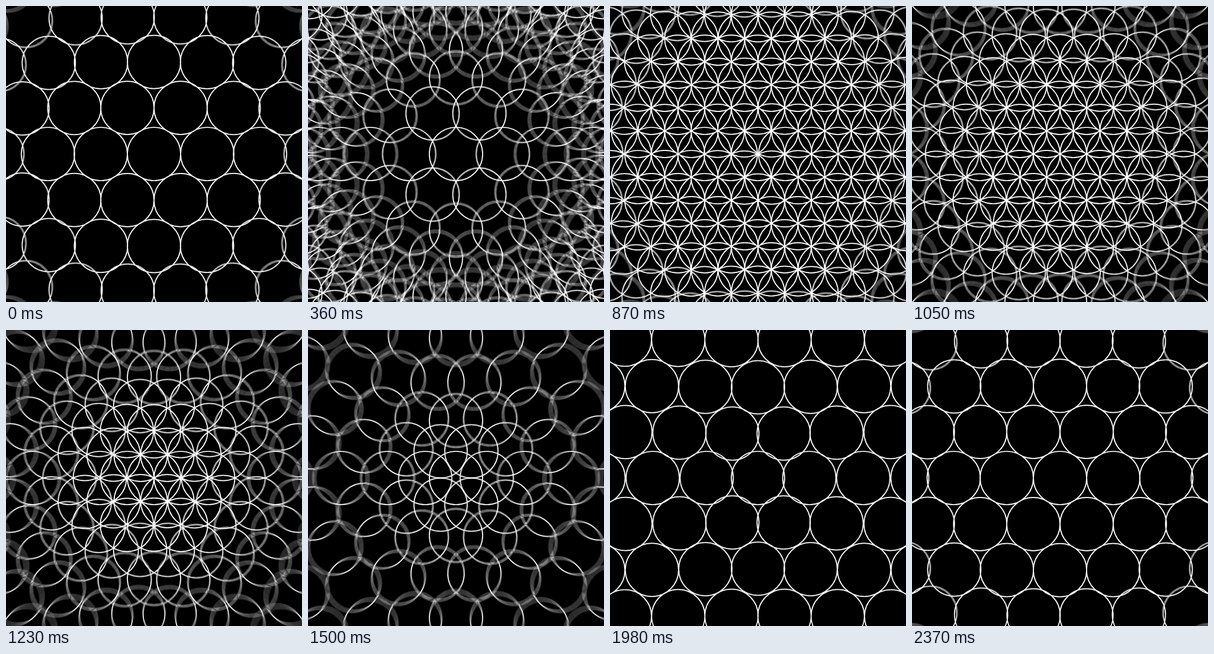
Animation, 500 px wide and 500 px high, one loop 2.4 s. Source, as an HTML page with a canvas:

```html
<!DOCTYPE html>
<html lang="en">
<head>
<meta charset="utf-8">
<title>Breathing circle lattice</title>
<style>
  html, body { margin: 0; width: 100%; height: 100%; overflow: hidden; background: #000; }
  canvas { display: block; width: 500px; height: 500px; }
</style>
</head>
<body>
<canvas id="stage" width="500" height="500"></canvas>
<script>
const SIZE = 500, MID = SIZE / 2;
const LOOP = 2400, STEP = 30;
const RADIUS = 45, GAP = 90, REACH = 820;
const LEAD = 0.945; // ms of head start per pixel from the centre
const SAMPLES = 15, SHUTTER = 1;
const TAU = Math.PI * 2;

const ctx = document.getElementById('stage').getContext('2d');

// Hexagonal lattice around the centre, with each point's distance from it.
const points = [];
for (let row = -11; row <= 11; row++) {
  for (let col = -16; col <= 16; col++) {
    const x = (col + row / 2) * GAP;
    const y = row * GAP * Math.sqrt(3) / 2;
    const dist = Math.hypot(x, y);
    if (dist < REACH) points.push({ x, y, dist });
  }
}

const smooth = p => p * p * (3 - 2 * p);

// Scale swings between 1 and 1/2; outer points move first.
function scaleAt(ms, dist) {
  const wave = (1 - Math.cos(TAU * (ms + LEAD * dist) / LOOP)) / 2;
  return 1 - smooth(wave) / 2;
}

function strokeLattice(ms) {
  const limit = MID + RADIUS + 2;
  ctx.beginPath();
  for (const { x, y, dist } of points) {
    const s = scaleAt(ms, dist);
    const px = x * s, py = y * s;
    if (Math.abs(px) > limit || Math.abs(py) > limit) continue;
    ctx.moveTo(MID + px + RADIUS, MID + py);
    ctx.arc(MID + px, MID + py, RADIUS, 0, TAU);
  }
  ctx.stroke();
}

// Motion blur: equal exposures across the open shutter add up to white.
function render(ms) {
  ctx.globalCompositeOperation = 'source-over';
  ctx.fillStyle = '#000';
  ctx.fillRect(0, 0, SIZE, SIZE);
  ctx.globalCompositeOperation = 'lighter';
  ctx.strokeStyle = '#111';
  ctx.lineWidth = 1.7;
  for (let i = 0; i < SAMPLES; i++) {
    strokeLattice(ms + STEP * SHUTTER * i / SAMPLES);
  }
}

let shown = -1;
function tick(now) {
  const step = Math.floor((now % LOOP + 2) / STEP) % (LOOP / STEP);
  if (step !== shown) {
    shown = step;
    render(step * STEP);
  }
  requestAnimationFrame(tick);
}

render(0);
requestAnimationFrame(tick);
</script>
</body>
</html>
```
